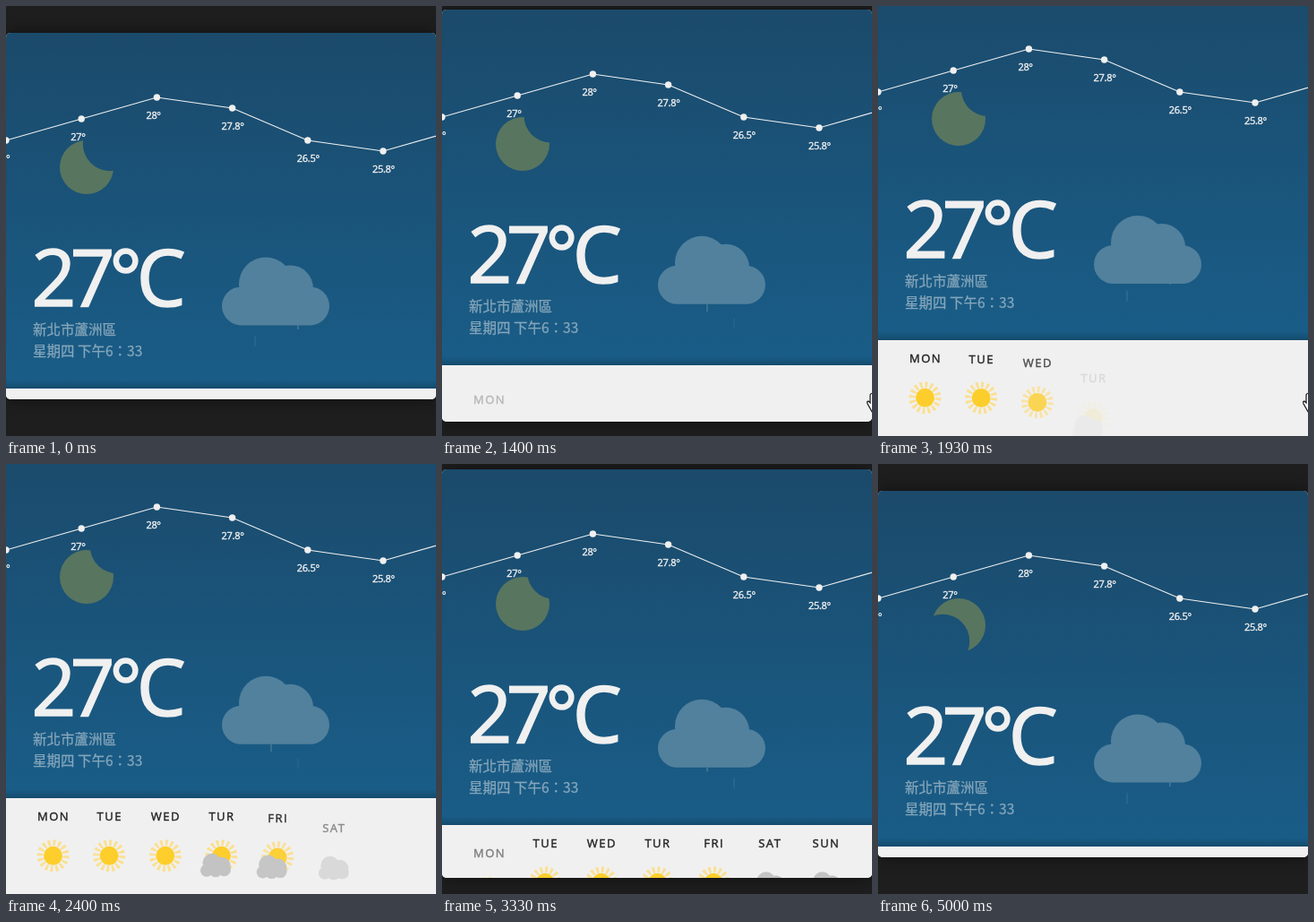
These frames come from a looping animation (480 px wide and 480 px high, 5070 ms). An HTML page:

```html
<!DOCTYPE html>
<html lang="zh-Hant">
<head>
<meta charset="utf-8">
<title>Weather card</title>
<style>
  html, body { margin: 0; width: 100%; height: 100%; overflow: hidden; background: #1e1e1e; }
  #stage { position: relative; width: 100%; height: 100%; overflow: hidden; contain: strict; }
  #card {
    position: absolute; left: 0; width: 480px; overflow: hidden; border-radius: 5px;
    background: #f0f0f0; box-shadow: 0 0 18px rgba(0, 0, 0, .45);
  }
  #card svg { display: block; }
  #cursor { position: absolute; left: 0; top: 0; }
  text { font-family: "Open Sans", "Noto Sans", sans-serif; fill: #f0f0f0; stroke: #f0f0f0; stroke-width: .4; }
  .temp { font-size: 87px; letter-spacing: -6.5px; stroke-width: 1.6; }
  .place { font: 15.5px "Noto Sans CJK TC", "Noto Sans CJK", "Noto Sans CJK JP", sans-serif; stroke-width: .25; opacity: .5; }
  .point { font-size: 11px; letter-spacing: -.3px; }
  .day { font-size: 13px; letter-spacing: 1.5px; text-anchor: middle; fill: #222; stroke: #222; }
</style>
</head>
<body>
<div id="stage">
<div id="card">
  <svg width="480" height="520" viewBox="0 30 480 520">
    <defs>
      <linearGradient id="sky" x2="0" y2="1">
        <stop stop-color="#1b4a6b"/><stop offset="1" stop-color="#195d88"/>
      </linearGradient>
      <linearGradient id="shade" x2="0" y2="1">
        <stop stop-opacity="0"/><stop offset="1" stop-opacity=".2"/>
      </linearGradient>
      <mask id="crescent">
        <circle cx="90" cy="180" r="30" fill="#fff"/>
        <circle id="bite" r="30"/>
      </mask>
      <clipPath id="below"><rect x="241" y="356" width="120" height="60"/></clipPath>
      <g id="sun">
        <circle r="14.5" fill="none" stroke="#fbe093" stroke-width="7" pathLength="32" stroke-dasharray="1"/>
        <circle r="10.5" fill="#fdce2b"/>
      </g>
      <g id="gray" fill="#c3c3c3">
        <circle cx="-4" cy="-1" r="10.5"/>
        <circle cx="7" cy="2" r="9.5"/>
        <circle cx="-10" cy="7.5" r="7"/>
        <circle cx="0" cy="7.5" r="7.5"/>
        <circle cx="9.5" cy="6.5" r="7.5"/>
      </g>
    </defs>
    <rect y="30" width="480" height="397" fill="url(#sky)"/>
    <rect x="60" y="150" width="61" height="61" fill="#58755f" mask="url(#crescent)"/>
    <g id="graph"></g>
    <text class="temp" x="28.5" y="335">27°C</text>
    <text class="place" x="30" y="367">新北市蘆洲區</text>
    <text class="place" x="30" y="391">星期四 下午6：33</text>
    <g id="cloud" fill="#52819d">
      <g id="rain" clip-path="url(#below)"></g>
      <rect x="241" y="313" width="120" height="43" rx="21.5"/>
      <circle cx="290" cy="310" r="30"/>
      <circle cx="317" cy="315" r="26"/>
    </g>
    <rect y="417" width="480" height="10" fill="url(#shade)"/>
    <rect y="427" width="480" height="130" fill="#f0f0f0"/>
    <g id="week"></g>
  </svg>
</div>
<svg id="cursor" width="480" height="480">
  <path d="M478 443V434.5Q478 432.5 480 432.5T482 434.5V440L489 442V448L487 453H480L475 444Q474 441 476 441Z" fill="#fff" stroke="#111" stroke-width="1.2"/>
</svg>
</div>
<script>
const LOOP = 5070;
const $ = id => document.getElementById(id);

// Temperature curve
const temps = [["26°", 150], ["27°", 126], ["28°", 102], ["27.8°", 114], ["26.5°", 150], ["25.8°", 162], ["27°", 138]];
const px = i => i * 84.2;
$("graph").innerHTML =
  `<polyline points="${temps.map(([, y], i) => [px(i), y])}" fill="none" stroke="#f0f0f0" stroke-width="1.1"/>` +
  temps.map(([label, y], i) =>
    `<circle cx="${px(i)}" cy="${y}" r="3.7" fill="#f0f0f0"/>
     <text class="point" x="${px(i) - 12}" y="${y + 24}">${label}</text>`).join("");

// Forecast row
const icons = {
  sun: '<use href="#sun"/>',
  mixed: '<use href="#sun"/><use href="#gray" x="-6.5" y="9"/>',
  gray: '<use href="#gray" y="-.5"/>'
};
const week = [["MON", "sun"], ["TUE", "sun"], ["WED", "sun"], ["TUR", "mixed"], ["FRI", "mixed"], ["SAT", "gray"], ["SUN", "gray"]];
$("week").innerHTML = week.map(([name, icon]) =>
  `<g><text class="day" x=".5" y="-39">${name}</text>${icons[icon]}</g>`).join("");
const days = [...$("week").children];

// Raindrops in falling order
const dropX = [278, 326, 296];
$("rain").innerHTML = dropX.map(x => `<rect x="${x - 1}" width="2" height="12"/>`).join("");
const drops = [...$("rain").children];

// The CSS "ease" curve, cubic-bezier(.25, .1, .25, 1)
function ease(x) {
  if (x <= 0) return 0;
  if (x >= 1) return 1;
  const bez = (s, a, b) => 3 * (1 - s) ** 2 * s * a + 3 * (1 - s) * s * s * b + s ** 3;
  let lo = 0, hi = 1;
  for (let i = 0; i < 24; i++) {
    const mid = (lo + hi) / 2;
    if (bez(mid, .25, .25) < x) lo = mid; else hi = mid;
  }
  return bez(lo, .1, 1);
}
const ramp = (t, start, length) => ease((t - start) / length);

function draw(t) {
  const open = ramp(t, 1160, 850) - ramp(t, 2990, 1050);
  $("card").style.top = 30 - 54 * open + "px";
  $("card").style.height = 409 + 107 * open + "px";

  const c = -18 + 54 * ease((t + 5100) % 10000 / 10000);
  $("bite").setAttribute("cx", 90 + c);
  $("bite").setAttribute("cy", 180 - c);

  const bob = 4.5 - 6.5 * Math.cos((t - 565) / 4000 * 2 * Math.PI);
  $("cloud").setAttribute("transform", `translate(0 ${bob})`);
  drops.forEach((drop, i) => {
    const u = (t / 1000 + 1.8 - i / 3) % 1;
    drop.setAttribute("y", 356 - 22 + 57 * u - 12);
    drop.setAttribute("opacity", Math.min(1, 1.2 * (1 - u)));
  });

  days.forEach((day, i) => {
    const shown = ramp(t, 1305 + 190 * i, 500) - ramp(t, 3198 + 190 * i, 500);
    day.setAttribute("transform", `translate(${52.5 + 62.66 * i} ${491.3 + 25 * (1 - shown)})`);
    day.setAttribute("opacity", shown);
  });

  const enter = 1 - ramp(t, 850, 280), leave = ramp(t, 1960, 160);
  $("cursor").style.transform = `translate(${12 * (enter + leave)}px, ${48 * enter}px)`;
}

function frame() {
  draw(performance.now() % LOOP);
  requestAnimationFrame(frame);
}
frame();
</script>
</body>
</html>
```
